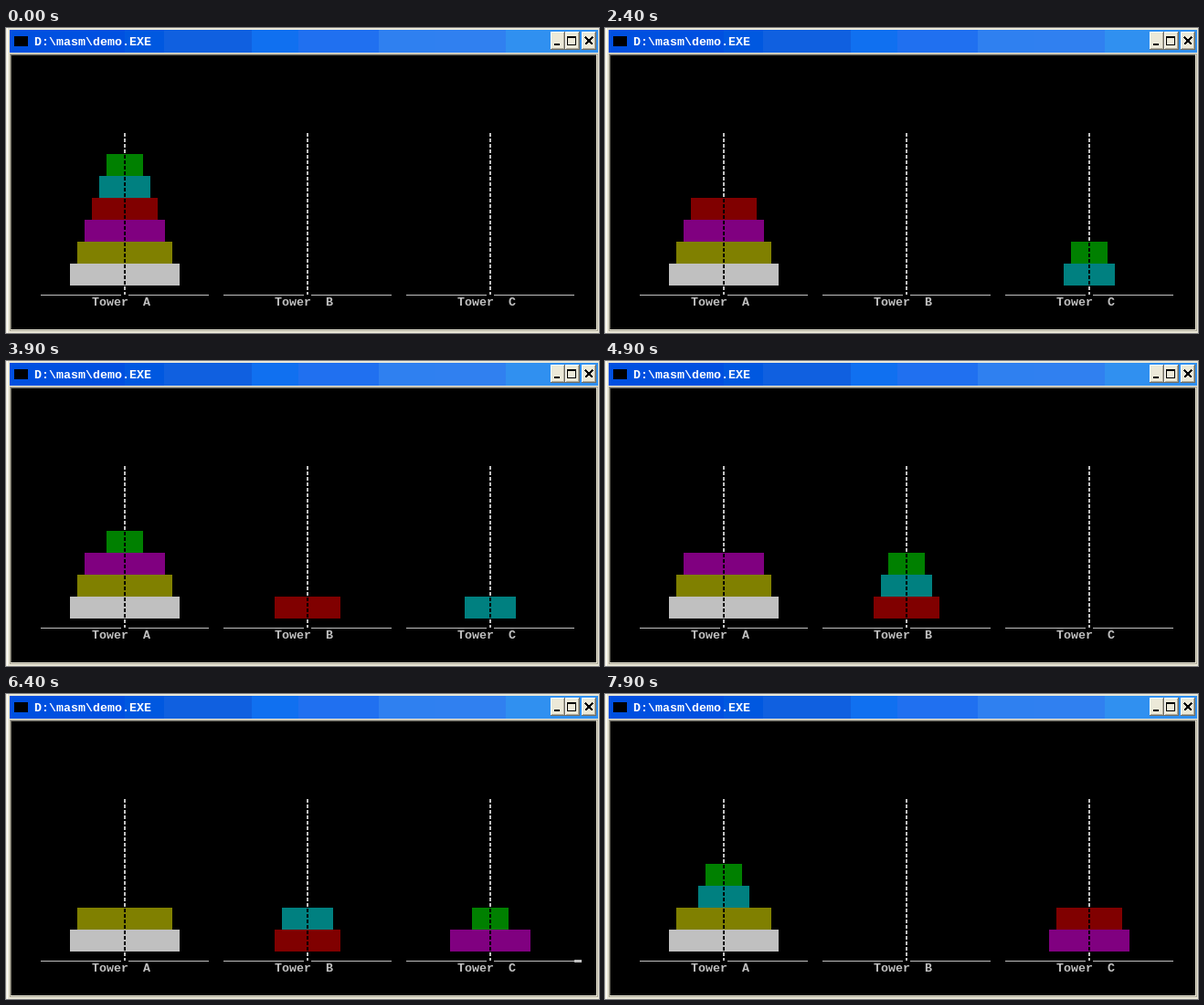
An HTML page for the animation above (8000 ms loop, 649 by 334 pixels).

```html
<!DOCTYPE html>
<html lang="en">
<head>
<meta charset="utf-8">
<title>Tower demo</title>
<style>
  html, body { margin: 0; width: 100%; height: 100%; overflow: hidden; background: #ece9d8; }
  svg { display: block; }
  text { font: bold 13.333px "Liberation Mono", monospace; white-space: pre; }
</style>
</head>
<body>
<svg id="stage" width="649" height="334" shape-rendering="crispEdges"></svg>
<script>
const stage = document.getElementById('stage');

function add(tag, attrs, parent = stage, text = '') {
  const el = document.createElementNS(stage.namespaceURI, tag);
  for (const key in attrs) el.setAttribute(key, attrs[key]);
  el.textContent = text;
  return parent.appendChild(el);
}
const rect = (x, y, width, height, fill, parent) => add('rect', {x, y, width, height, fill}, parent);
const path = (d, stroke, width) => add('path', {d, stroke, fill: 'none', 'stroke-width': width});
const label = (x, y, fill, text) => add('text', {x, y, fill}, stage, text);
const pole = (x, y, height, stroke, parent) => add('path',
  {d: `M${x} ${y}v${height}`, stroke, 'stroke-width': 2, 'stroke-dasharray': '4 2'}, parent);

function button(x, width) {
  rect(x, 4, width, 20, '#716f64');
  rect(x, 4, width - 1, 19, '#fff');
  rect(x + 1, 5, width - 2, 18, '#aca899');
  rect(x + 1, 5, width - 3, 17, '#ece9d8');
}

// Window frame and title bar
rect(0, 0, 649, 334, '#ece9d8');
rect(1, 0, 1, 334, '#fff');
const bands = [[4, '#0050e0'], [130, '#0058e0'], [173, '#1060e0'], [269, '#1070f0'],
  [320, '#2070f0'], [408, '#2f80f0'], [469, '#3080f0'], [547, '#3090f0']];
for (const [x, color] of bands) rect(x, 2, 648 - x, 25, color);
rect(9, 9, 15, 11, '#000');
label(31, 19, '#fff', 'D:\\masm\\demo.EXE');
button(596, 16);
button(612, 16);
button(630, 16);
rect(600, 17, 6, 2, '#000');
path('M614.5 10v8.5h9V10', '#000', 1);
rect(614, 9, 10, 2, '#000');
path('M634 10l8 8M642 10l-8 8', '#000', 2);

// Console
rect(4, 28, 644, 304, '#aca899');
rect(5, 29, 642, 302, '#716f64');
rect(646, 29, 1, 302, '#ece9d8');
rect(5, 330, 642, 1, '#ece9d8');
rect(6, 30, 640, 300, '#000');

const GREY = '#c0c0c0';
const towerX = [130, 330, 530];
towerX.forEach((x, i) => {
  pole(x, 115, 177, GREY);
  rect(x - 92, 292, 88, 1, GREY);
  rect(x + 4, 292, 88, 1, GREY);
  label(x - 36, 304, GREY, 'Tower  ' + 'ABC'[i]);
});
const cursor = rect(622, 291, 8, 3, GREY);

const disks = ['#008000', '#008080', '#800000', '#800080', '#808000', GREY].map((color, i) => {
  const disk = add('g', {});
  rect(-20 - 8 * i, 0, 40 + 16 * i, 24, color, disk);
  pole(0, 1, 23, '#000', disk);
  return disk;
});

// One entry per half second: move from tower to tower, "*" for a lit cursor
const steps = '-* AB AC -* BC AB* - CA CB* AB AC* BC -* BA* CA* BC'.split(' ');

function draw(now) {
  const count = Math.floor((now % 8000 + 100) / 500);
  const towers = {A: [5, 4, 3, 2, 1, 0], B: [], C: []};
  for (const [from, to] of steps.slice(0, count))
    if (from !== '-') towers[to].push(towers[from].pop());
  Object.values(towers).forEach((stack, i) => stack.forEach((disk, level) =>
    disks[disk].setAttribute('transform', `translate(${towerX[i]} ${258 - 24 * level})`)));
  const lit = count > 0 && steps[count - 1].endsWith('*');
  cursor.setAttribute('visibility', lit ? 'visible' : 'hidden');
}

const start = performance.now();
function tick() {
  draw(performance.now() - start);
  requestAnimationFrame(tick);
}
tick();
</script>
</body>
</html>
```
